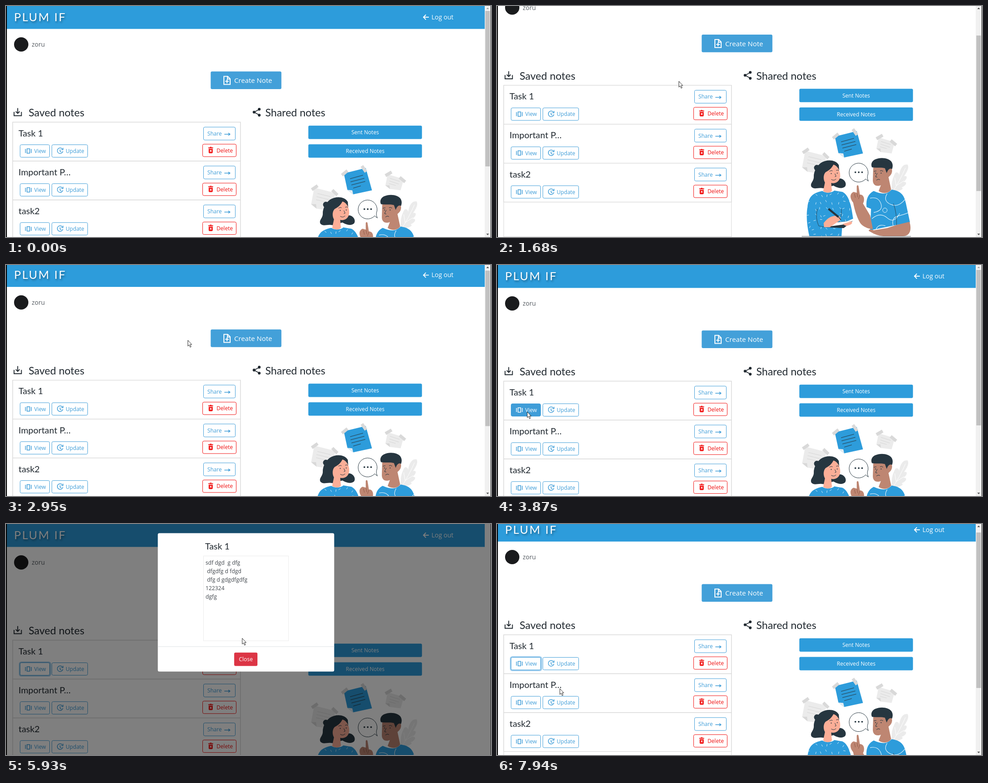
Write an HTML page that moves like this. It is 1084 px wide and 517 px high and loops after 8 s.

```html
<!DOCTYPE html>
<html lang="en">
<head>
<meta charset="utf-8">
<title>Notes</title>
<style>
html, body { margin: 0; width: 100%; height: 100%; overflow: hidden; background: #fff; }
svg { display: block; width: 1084px; height: 517px; }
text { font-family: "Open Sans", "Noto Sans", sans-serif; font-size: 12.1px; white-space: pre; }
.lato { font-family: Lato, sans-serif; font-size: 19.9px; fill: #212930; }
.big { font-size: 23.5px; }
.brand { font-size: 25.6px; letter-spacing: 2.6px; fill: #fff; filter: drop-shadow(2px 3px 2px rgba(0,0,0,.35)); }
.foot { font-size: 12px; font-weight: 700; letter-spacing: .8px; fill: #fff; }
.mid { text-anchor: middle; }
.btn { color: #3f9dd8; }
.red { color: #f01010; }
.btn .box { fill: #fff; stroke: currentColor; }
.btn .in { color: inherit; }
.btn text { fill: currentColor; }
.hot .box { fill: #3f9dd8; }
.hot .in { color: #fff; }
.line { fill: none; stroke: currentColor; stroke-width: 1.5; }
</style>
</head>
<body>
<svg id="stage" viewBox="0 0 1084 517"></svg>
<script>
const BLUE = '#2d9cdb', DARK = '#263640', SKIN = '#fbae97', BROWN = '#be8672', LOOP = 8000;

const rect = (x, y, w, h, fill, r = 0, more = '') =>
  `<rect x="${x}" y="${y}" width="${w}" height="${h}" rx="${r}" fill="${fill}" ${more}/>`;
const path = (d, fill = 'none', stroke = 'none', w = 1, more = '') =>
  `<path d="${d}" fill="${fill}" stroke="${stroke}" stroke-width="${w}" ${more}/>`;
const dot = (x, y, r, fill, more = '') => `<circle cx="${x}" cy="${y}" r="${r}" fill="${fill}" ${more}/>`;
const text = (x, y, s, cls = '', more = '') => `<text x="${x}" y="${y}" class="${cls}" ${more}>${s}</text>`;
const size = (n, fill) => `style="font-size:${n}px;fill:${fill}"`;
const line = d => `<path class="line" d="${d}"/>`;

let seed = 7;
const rnd = () => (seed = (seed * 16807) % 2147483647) / 2147483647;

function button(x, y, w, h, label, tx, icon, cls = '', id = '') {
  return `<g class="btn ${cls}" id="${id}"><rect class="box" x="${x}" y="${y}" width="${w}" height="${h}" rx="3"/>
    <g class="in">${icon}${text(tx, y + h / 2 + 4.4, label)}</g></g>`;
}

function row(i, title) {
  const y = 260 + 87.1 * i;
  const viewIcon = line(`M43.5 ${y + 60}v9M56.5 ${y + 60}v9M47 ${y + 59.5}h6v10h-6z`);
  const updateIcon = line(`M126 ${y + 60}a6.3 6.3 0 1 0 1.2 5M127.5 ${y + 57.5}v4h-4M120.8 ${y + 61}v4l3 2`);
  const shareIcon = line(`M488 ${y + 27}h12M497 ${y + 24.2}l3.6 2.8l-3.6 2.8`);
  const binIcon = path(`M452 ${y + 56.5}h3l1-1.2h3l1 1.2h3v1.7h-11zM453 ${y + 59.5}h9v8q0 2-2 2h-5q-2 0-2-2z`, 'currentColor') +
    path(`M455.6 ${y + 62}l4 4.5m0-4.5l-4 4.5`, 'none', '#fff', 1.2);
  return rect(15, y, 509, 87.1, '#fff', 0, 'stroke="#dcdcdc" stroke-width="1.4"') +
    text(28, y + 31.8, title, 'lato') +
    button(441.5, y + 11, 71, 29, 'Share', 450, shareIcon) +
    button(439.5, y + 49.2, 75, 28, 'Delete', 470.5, binIcon, 'red') +
    (i ? '' : rect(30.3, y + 49.4, 69, 30.4, 'none', 4, 'id="focus" stroke="#9fcdee" stroke-width="3"')) +
    button(31.5, y + 50.5, 66, 28, 'View', 63, viewIcon, '', 'view' + i) +
    button(102.5, y + 50.5, 80, 28, 'Update', 133.5, updateIcon, '', 'update' + i);
}

function papers() {
  const tape = (x, y, a) => rect(-8, -3.5, 16, 7, '#d9d9d9', 0, `transform="translate(${x} ${y}) rotate(${a})"`);
  return path('M689 200L736 212L729 252L694 247L682 237Z', '#ebebeb') +
    path('M682 237L693 237L694 247Z', '#d8d8d8') +
    path('M696 213l29 7M694 220l29 7M693 227l26 6', 'none', '#d6d6d6') + tape(690, 200, -35) + tape(735, 211, 45) +
    path('M853 170L889 181L882 206L858 203L848 195Z', '#ebebeb') + path('M848 195l9 0l1 8z', '#d8d8d8') +
    path('M858 179l22 7M857 185l21 7M856 191l15 4', 'none', '#d6d6d6') + tape(855, 169, -30) + tape(886, 182, 40) +
    path('M755 168L804 156L818 206L776 215L763 205Z', BLUE) + path('M763 205L774 206L776 215Z', '#e4edf3') +
    path('M769 180l29-8M770 187l31-8M772 194l31-8M776 201l17-5', 'none', DARK) +
    tape(757, 167, -40) + tape(800, 158, 55);
}

function plant() {
  return path('M883 292C880 275 884 262 889 252C892 244 900 250 899 256C900 240 908 228 918 231C922 240 914 250 910 257C918 254 918 263 908 270C918 268 916 278 904 282C912 285 900 291 883 292Z', '#ebebeb') +
    path('M884 292Q900 268 913 238M892 278l-3-18M892 278l18-11', 'none', '#fff');
}

function woman() {
  const body = 'M727 290C704 295 697 303 694 325C690 350 694 372 698 391L770 391L772 362L796 352C792 325 788 300 772 292L754 289C748 295 734 295 727 290Z';
  let d = '';
  for (let i = 0; i < 54; i++) {
    const a = rnd() * Math.PI;
    d += `M${694 + (i % 8) * 13 + rnd() * 7} ${293 + Math.floor(i / 8) * 15 + rnd() * 8}l${5 * Math.cos(a)} ${5 * Math.sin(a)}`;
  }
  return dot(715, 238, 6.5, DARK) +
    path('M703 281C698 273 709 268 708 257C708 246 715 234 724 227C736 219 757 219 764 232L766 262C775 262 783 272 778 280C772 286 760 283 752 278L730 284C718 281 710 288 703 281Z', DARK) +
    path(body, BLUE) + `<clipPath id="sweater"><path d="${body}"/></clipPath>` +
    path(d, 'none', '#eaf6fd', .9, 'clip-path="url(#sweater)"') +
    path('M716 330Q711 350 719 368L734 371M770 330L769 348', 'none', DARK, .8) +
    path('M736 247C742 244 748 239 752 231C762 234 768 246 767 258C765 271 754 274 747 272L748 285C752 293 738 297 729 290L733 271C728 263 730 250 736 247Z', SKIN) +
    path('M743 246q4-3 7-1M758 244q3-2 6 0M755 251l3 6l-3 1M747 264q6 4 11-1', 'none', DARK) +
    dot(747, 251, 1.1, DARK) + dot(760.5, 250, 1.1, DARK) +
    path('M734 371L753 360L795 357L775 373Z', DARK) + path('M750 361L794 357L783 364L745 369Z', '#fff') +
    path('M730 362C740 348 752 344 764 346C771 350 768 356 760 360L744 371L731 371Z', SKIN) +
    path('M772 364L792 358C797 362 790 367 780 368Z', SKIN) +
    path('M741 330L763 348', 'none', DARK, 4.5) + path('M763 348l6 7', 'none', DARK, 1.5);
}

function man() {
  const shirt = 'M842 290C860 298 872 298 882 287C902 290 910 298 914 318L923 360C912 368 900 364 893 366L834 378L836 330L826 326C824 308 830 296 842 290Z';
  return path(shirt, BLUE) + `<clipPath id="shirt"><path d="${shirt}"/></clipPath>` +
    path('M834 306Q852 302 858 318T842 338M872 296Q862 312 880 320T914 306M838 352Q856 336 872 350T900 340M886 370Q880 350 896 346T926 336M846 378Q852 362 868 368', 'none', '#eaf6fd', 1.1, 'clip-path="url(#shirt)"') +
    dot(867, 333, 5, 'none', 'stroke="#eaf6fd"') +
    path('M886 318Q894 340 893 366', 'none', DARK, .8) +
    path('M841 234L874 234C876 238 884 236 883 246C882 254 877 257 875 259L881 287C874 297 860 296 853 290L858 277C848 281 840 277 840 266Z', BROWN) +
    path('M838 237C834 228 840 221 846 219C856 214 876 215 882 225C886 232 884 237 883 241C877 237 873 244 871 250L867 239C858 236 848 239 838 237Z', DARK) +
    path('M842 246l6-1M856 245q4-2 7 1M850 250l-4 8l4 1M848 266q4-4 8-1', 'none', DARK) +
    dot(846, 250, 1.1, DARK) + dot(858.5, 250, 1.1, DARK) +
    path('M804 279Q806 275 808 279L811 298C822 298 822 312 818 318L834 345L840 375C832 376 818 370 812 362C802 345 798 325 796 316C788 306 788 296 797 292L804 294Z', BROWN) +
    path('M799 296l2 9M805 295l1 9M811 299l-3 9', 'none', '#85513f', .8) +
    path('M893 366L922 359C927 376 924 390 908 391L868 391C852 391 842 386 832 380C828 376 836 374 842 378L872 373Z', BROWN);
}

function bubble() {
  return path('M824 263A21.2 21.2 0 1 1 828 256.5Q827 262 830 268Z', '#fff', DARK) +
    [801, 808.5, 816].map(x => dot(x, 248, 1.9, DARK)).join('');
}

function page() {
  return rect(2, 0, 1068, 740, '#fff') + rect(2, 0, 1068, 51.3, BLUE) +
    text(18, 33.7, 'PLUM IF', 'lato brand') +
    path('M945 25h-12M938.5 19.5l-5.5 5.5l5.5 5.5', 'none', '#fff', 1.8) +
    text(951, 29.6, 'Log out', '', size(14, '#fff')) +
    dot(34, 86, 16, '#1a1b1d') + text(57.5, 91, 'zoru', '', size(14, '#555b61')) +
    rect(457.5, 146.6, 158, 39.4, '#43a0d9', 3) +
    path('M487 157.5h8.5l5.5 5.5v12.5h-14zM495 157.5v6h6M494 164.5v8M490 168.5h8', 'none', '#fff', 2) +
    text(510, 172.4, 'Create Note', '', size(15.2, '#fff')) +
    path('M18 237v8.5h16.5v-8.5M26.2 228.5v11.5M21.8 236l4.4 4.4l4.4-4.4', 'none', '#212930', 1.9) +
    text(50.5, 247.4, 'Saved notes', 'lato big') +
    path('M566 231.5L554.5 237.5L566 244', 'none', '#212930', 1.7) +
    [[566, 231], [554.5, 237.5], [566, 244.3]].map(p => dot(p[0], p[1], 3.1, '#212930')).join('') +
    text(579.5, 247.4, 'Shared notes', 'lato big') +
    rect(15, 260, 509, 339, '#fff', 0, 'stroke="#dcdcdc" stroke-width="1.2"') +
    ['Task 1', 'Important P…', 'task2'].map((s, i) => row(i, s)).join('') +
    ['Sent Notes', 'Received Notes'].map((s, i) => rect(675.7, 267.7 + 41.8 * i, 254, 30, BLUE, 3) +
      text(802.7, 287.2 + 41.8 * i, s, 'mid', 'fill="#fff"')).join('') +
    `<g transform="translate(0 206.6)">${path('M681 391.3H925', 'none', '#6d757a')}
      ${papers()}${plant()}${woman()}${man()}${bubble()}</g>` +
    rect(2, 637.1, 1068, 103, BLUE) +
    text(536, 664.8, 'PLUM IF', 'lato foot mid') +
    text(511.5, 687.8, 'Made with', 'lato foot', 'text-anchor="end"') +
    path('M519 687.3C513.5 683 515.5 680 517.2 680.2Q518.5 680.4 519 681.8Q519.5 680.4 520.8 680.2C522.5 680 524.5 683 519 687.3Z', 'none', '#fff', 1.2) +
    text(526.5, 687.8, ',by Nilan Dorvey', 'lato foot') +
    text(536, 710.8, 'Graphics - www.haltief.com', 'lato foot mid');
}

function modal() {
  const lines = ['sdf dgd  g dfg', ' dfgdfg d fdgd', ' dfg d gdgdfgdfg', '122324', 'dgfg'];
  return rect(339.3, 20.5, 394.2, 309.7, '#fff', 3.5) + text(445, 56.6, 'Task 1', 'lato') +
    rect(441.5, 71.5, 190, 190, '#fff', 0, 'stroke="#ececec"') +
    lines.map((s, i) => text(446, 90.5 + 19 * i, s, '', size(12.3, '#40464c'))).join('') +
    rect(339.3, 274, 394.2, 1, '#dee2e6') + rect(510, 287.7, 52, 30, '#dc3545', 3) +
    text(536, 307.2, 'Close', 'mid', size(12.3, '#fff'));
}

const stage = document.getElementById('stage');
stage.innerHTML = rect(0, 0, 1084, 517, '#fff') + `<g id="page">${page()}</g>` +
  `<g id="bar">${rect(1070, 0, 13, 517, '#f1f1f1')}${rect(1071.3, 11, 10.5, 348, '#c1c1c1', 0, 'id="thumb"')}
    ${path('M1073.5 7l3-3.6l3 3.6z', '#505050', 'none', 1, 'id="up"')}${path('M1073.5 509.5l3 3.6l3-3.6z', '#505050', 'none', 1, 'id="down"')}</g>` +
  rect(0, 0, 1084, 517, '#000', 0, 'id="shade"') + `<g id="modal">${modal()}</g>` +
  rect(0, 0, 2, 517, '#000') + rect(1083, 0, 1, 517, '#222') +
  `<g id="cursor">${path('M.5 .5V13.5L3.4 10.8L5.6 16L7.8 15L5.6 10H9.3Z', '#fff', '#111', .9)}</g>`;

const el = {};
for (const id of ['page', 'bar', 'thumb', 'up', 'down', 'shade', 'modal', 'cursor', 'focus', 'view0', 'update0'])
  el[id] = document.getElementById(id);

// Held scroll positions: [from ms, offset]
const scrolls = [[0, 0], [1540, 6], [1610, 32], [1680, 82.5], [1740, 200], [1820, 220], [2680, 206.6],
  [2750, 160], [2820, 85], [2880, 24], [2950, 2.3], [3020, 0], [7940, 12]];

// Pointer moves: [first step, last step, steps, x, y]
const moves = [[270, 670, 7, 446, 256], [990, 1300, 5, 406, 168], [3020, 3460, 7, 168, 283],
  [3520, 3870, 6, 67, 328], [4830, 5580, 12, 489, 48], [5650, 6060, 7, 537, 306.5],
  [6730, 7020, 5, 320, 276], [7090, 7250, 3, 150, 335], [7320, 7480, 3, 75, 325],
  [7610, 7610, 1, 122, 332], [7680, 7740, 2, 140, 368]];

const clamp = v => Math.max(0, Math.min(1, v));
const smooth = p => p * p * (3 - 2 * p);

function stepped(t, from, to, n) {
  if (t < from) return 0;
  if (t >= to) return 1;
  return (Math.floor((t - from) / (to - from) * (n - 1) + 1e-6) + 1) / n;
}

function pointer(t) {
  let x = 992, y = 520;
  for (const [from, to, n, nx, ny] of moves) {
    const p = smooth(stepped(t, from, to, n));
    x += (nx - x) * p;
    y += (ny - y) * p;
  }
  return [x, y];
}

function draw(t) {
  const scroll = scrolls.filter(s => s[0] <= t).pop()[1];
  el.page.setAttribute('transform', `translate(0 ${-scroll})`);
  el.thumb.setAttribute('y', 11 + scroll * .668);
  el.up.setAttribute('fill', scroll > 0 ? '#505050' : '#a3a3a3');
  el.down.setAttribute('fill', scroll < 220 ? '#505050' : '#a3a3a3');

  const open = stepped(t, 4150, 4480, 5), shut = stepped(t, 6200, 6590, 7);
  const shade = clamp(open * 2.5) * clamp((.86 - shut) * 3);
  const enter = clamp((open - .2) / .8), leave = clamp(shut / .57);
  const show = (1 - (1 - enter) ** 2) * (1 - leave) ** 1.3;
  el.shade.setAttribute('opacity', shade > .02 ? shade / 2 : 0);
  el.modal.setAttribute('opacity', show);
  el.modal.setAttribute('transform', `translate(0 ${-40 * (1 - show)})`);
  el.bar.setAttribute('visibility', shade > .02 ? 'hidden' : 'visible');
  el.focus.setAttribute('visibility', t >= 4150 ? 'visible' : 'hidden');

  const [x, y] = pointer(t);
  el.cursor.setAttribute('transform', `translate(${x} ${y})`);
  el.cursor.setAttribute('visibility', t < 270 ? 'hidden' : 'visible');
  const level = shade <= .02 && y + scroll > 310 && y + scroll < 339;
  el.view0.classList.toggle('hot', level && x > 31 && x < 98);
  el.update0.classList.toggle('hot', level && x > 102 && x < 183);
}

function tick() {
  draw(performance.now() % LOOP);
  requestAnimationFrame(tick);
}
tick();
</script>
</body>
</html>
```
